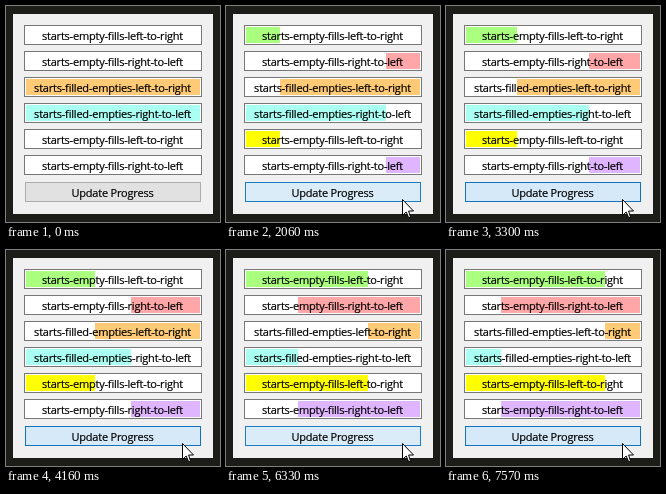
An HTML page that plays this animation: 214x216 px, repeating every 8 s.

```html
<!DOCTYPE html>
<html lang="en">
<head>
<meta charset="utf-8">
<title>Progress bars</title>
<style>
  html, body { margin: 0; width: 100%; height: 100%; overflow: hidden; background: #1c1c18; }
  div, svg { position: absolute; box-sizing: border-box; }
  #panel { left: 7px; top: 8px; width: 200px; height: 200px; background: #f0f0f0; }
  .bar, #button {
    height: 20px; padding-right: 1px; border: 1px solid #777; color: #000;
    font: 11px/20px "Open Sans", "Noto Sans", sans-serif;
    letter-spacing: -.2px; -webkit-text-stroke: .2px #000;
    text-align: center; white-space: nowrap;
  }
  .bar { left: 18px; width: 178px; background: #fff; }
  .bar span { position: relative; }
  .fill { top: 1px; height: 16px; }
  #button { left: 19px; top: 176px; width: 176px; }
  #cursor { left: 0; top: 0; }
</style>
</head>
<body>
<div id="panel"></div>
<div id="button">Update Progress</div>
<svg id="cursor" width="13" height="20">
  <path d="M.5.5V16.5L4.2 13L6.6 18.5H8.6L6.6 12H11.5Z" fill="#fff" stroke="#000"/>
</svg>
<script>
const LOOP = 8000, INNER = 176;
const updates = [1130, 2060, 2910, 3780, 4620, 5480, 6330, 7190];
const presses = [590, 1530, 2380, 3230, 4090, 4860, 5710, 6570, 7500];

// color, starts filled, anchored to the right edge
const bars = [
  ['#aaff7f', false, false],
  ['#ffa6a9', false, true],
  ['#ffca75', true, true],
  ['#aafff3', true, false],
  ['#ffff00', false, false],
  ['#dfb5ff', false, true],
].map(([color, full, right], i) => {
  const bar = document.createElement('div');
  const way = right !== full ? 'right-to-left' : 'left-to-right';
  bar.className = 'bar';
  bar.style.top = 19 + 26 * i + 'px';
  bar.innerHTML = `<div class="fill"></div><span>starts-${full ? 'filled-empties' : 'empty-fills'}-${way}</span>`;
  const fill = bar.firstChild;
  fill.style.background = color;
  fill.style[right ? 'right' : 'left'] = '1px';
  button.before(bar);
  return { fill, full };
});

const clamp = x => Math.min(1, Math.max(0, x));
const mix = (a, b, k) => `rgb(${a.map((v, i) => Math.round(v + (b[i] - v) * k))})`;
const latest = (times, t) => times.filter(x => x <= t).pop() ?? -1;

const idle = [225, 225, 225], hover = [229, 241, 251], down = [204, 228, 247];
const idleEdge = [173, 173, 173], hoverEdge = [45, 138, 208], downEdge = [0, 100, 175];

function paintButton(t) {
  const press = latest(presses, t), release = latest(updates, t);
  if (press < 0 && release < 0) {
    const k = clamp((t - 100) / 260);
    button.style.background = mix(idle, hover, k);
    button.style.borderColor = mix(idleEdge, hoverEdge, k);
    return;
  }
  const depth = press > release
    ? 0.3 + 0.3 * clamp((t - press) / 70)
    : 0.4 * (1 - clamp((t - release) / 230));
  button.style.background = mix(hover, down, depth);
  button.style.borderColor = mix(hoverEdge, downEdge, depth);
}

function draw(now) {
  const t = now % LOOP;
  const done = Math.floor(INNER * updates.filter(x => x <= t).length / 10);
  for (const { fill, full } of bars) {
    const width = full ? INNER - done : done;
    fill.style.width = Math.min(INNER - 2, Math.max(0, width - 1)) + 'px';
  }
  paintButton(t);
  const away = (1 - clamp((t - 70) / 200)) ** 2;
  cursor.style.visibility = t < 70 ? 'hidden' : 'visible';
  cursor.style.transform = `translate(${Math.round(176 + 9 * away)}px, ${Math.round(193 + 16 * away)}px)`;
  requestAnimationFrame(() => draw(performance.now() - start));
}

const start = performance.now();
draw(0);
</script>
</body>
</html>
```
